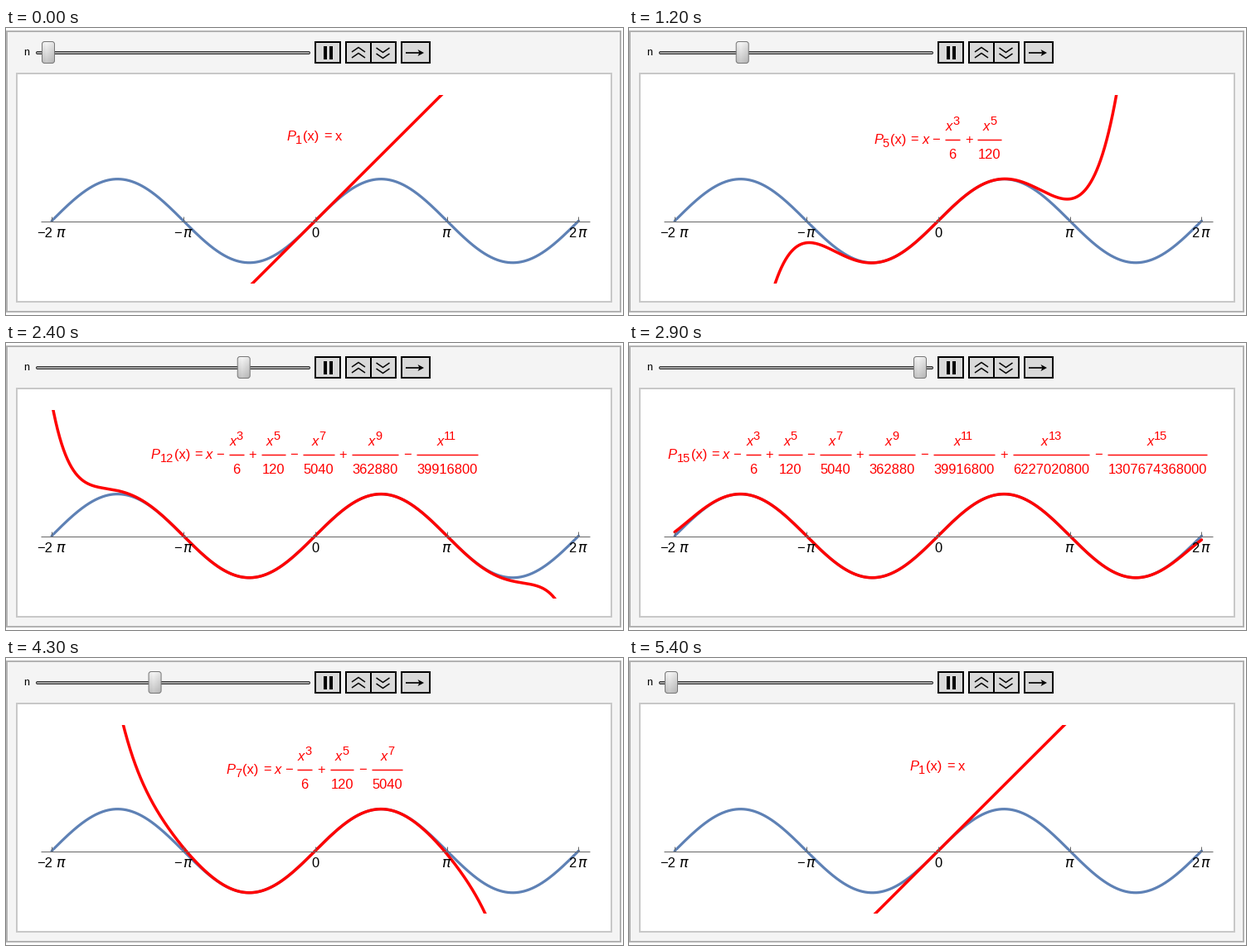
A matplotlib script that plays this animation: 744 px wide and 347 px high, repeating every 6000 ms.

```python
import math

import numpy as np
import matplotlib.pyplot as plt
from matplotlib.animation import FuncAnimation
from matplotlib.patches import FancyBboxPatch, Polygon, Rectangle

W, H, DPI = 744, 347, 100
PT = 72 / DPI                      # points per pixel
UNIT, X0, Y0 = 50.56, 372.8, 233.2  # plot scale and origin
RED, BLUE, AXIS = "#ff0000", "#5e81b5", "#666666"
N_MAX, FRAMES, INTERVAL = 15, 60, 100
MID, PAD, GAP = 372.3, 85, 21.6    # formula centre, prefix width, operator gap
BIG, SMALL = 16.5, 14.6            # font sizes in pixels

fig = plt.figure(figsize=(W / DPI, H / DPI), dpi=DPI, facecolor="white")
ax = fig.add_axes([0, 0, 1, 1])
ax.set_xlim(0, W)
ax.set_ylim(H, 0)
ax.axis("off")


def label(x, y, s, size=BIG, color="black", ha="left", italic=False,
          font="Liberation Sans"):
    return ax.text(x, y, s, fontsize=size * PT, color=color, ha=ha,
                   va="baseline", family=font, zorder=8,
                   style="italic" if italic else "normal")


def line(xs, ys, color, width, z=4, cap="butt"):
    return ax.plot(xs, ys, color=color, lw=width * PT, zorder=z,
                   solid_capstyle=cap, solid_joinstyle="miter")[0]


def box(x1, y1, x2, y2, face, edge, width=2):
    ax.add_patch(Rectangle((x1, y1), x2 - x1, y2 - y1, fc=face, ec=edge,
                           lw=width * PT, zorder=1))


def rounded(x, y, w, h, r, face, edge, z):
    shape = FancyBboxPatch((x, y), w, h, fc=face, ec=edge, lw=PT, zorder=z,
                           boxstyle=f"round,pad=0,rounding_size={r}")
    return ax.add_patch(shape)


def draw_panel():
    box(1, 4, 741, 343, "#f4f4f4", "#b2b2b2")
    box(13, 55, 730, 331, "white", "#c8c8c8")
    label(21, 33, "n", 12.5)
    rounded(36.5, 28.5, 330, 3, 1.5, "#a0a0a0", "#333333", 2)

    for x1, x2 in ((373, 403), (410, 440), (440, 470), (477, 511)):
        box(x1, 17, x2, 42, "#d9d9d9", "black")
    for x in (383, 390):
        ax.add_patch(Rectangle((x, 22), 4, 16, fc="black", lw=0, zorder=3))
    for y in (23.5, 30.5):
        line([417, 425, 433], [y + 5.5, y, y + 5.5], "black", 1.5)
        line([446.5, 454.5, 462.5], [y + 0.5, y + 6, y + 0.5], "black", 1.5)
    line([482, 501], [30, 30], "black", 1.7)
    ax.add_patch(Polygon([(504, 30), (496.5, 26), (498.5, 30), (496.5, 34)],
                         fc="black", lw=0, zorder=4))


def draw_axes():
    line([42, 704], [233.5, 233.5], AXIS, 1, 6)
    for k in range(-2, 3):
        x = X0 + k * math.pi * UNIT
        line([x, x], [228, 233], AXIS, 1, 6)
    for x, s in ((37.5, "\u22122"), (202.5, "\u2212"), (678.5, "2"), (368, "0")):
        label(x, 253, s)
    for x in (60.5, 213.5, 525.5, 689.5):
        label(x, 253, "\u03c0", 17.5, italic=True, font="DejaVu Sans")


def bar_width(k):
    return max(18, 9.17 * len(str(math.factorial(k))) + 0.9)


def formula(n):
    """Build the hidden artists that spell out the polynomial of order n."""
    powers = range(3, n + 1, 2)
    shift = 8 * (len(str(n)) - 1)
    total = PAD + shift - GAP + sum(bar_width(k) + GAP for k in powers)
    if not powers:
        total = 66
    x = MID - total / 2
    base = 140 if powers else 136
    parts = []

    def put(*args, **kw):
        parts.append(label(*args, color=RED, **kw))

    put(x - 0.8, base, "P", italic=True)
    put(x + 10, base + 4, str(n), size=SMALL)
    x += shift
    put(x + 19, base, "(x)")
    put(x + 48.5, base, "=", ha="center")
    put(x + 61.5, base, "x", ha="center", italic=bool(powers))

    x += PAD
    for i, k in enumerate(powers):
        w = bar_width(k)
        mid = x + w / 2
        op = x - (10.5 if i == 0 else GAP / 2)
        put(op, base, "+" if i % 2 else "\u2212", ha="center")
        left = mid - (8.3 + 8.1 * len(str(k))) / 2
        put(left, 124, "x", italic=True)
        put(left + 8.6, 117, str(k), size=SMALL)
        put(mid, 158, str(math.factorial(k)), ha="center")
        parts.append(line([x, x + w], [135, 135], RED, 1.4))
        x += w + GAP

    for p in parts:
        p.set_visible(False)
    return parts


def taylor(t, n):
    return sum((-1) ** (k // 2) * t ** k / math.factorial(k)
               for k in range(1, n + 1, 2))


def order(frame):
    """Order rises from 1 to 15 and falls back, one step per 1.75 frames."""
    steps = math.floor((frame - 6) / 1.75) + 1
    steps = min(max(steps, 0), 2 * (N_MAX - 1))
    return N_MAX - abs(N_MAX - 1 - steps)


draw_panel()
draw_axes()

t = np.linspace(-2 * math.pi, 2 * math.pi, 800)
line(X0 + UNIT * t, Y0 - UNIT * np.sin(t), BLUE, 3.2, 3, "round")
curve = line([], [], RED, 3.5, 5, "round")
window = Rectangle((42, 81), 662, 228, transform=ax.transData)
curve.set_clip_path(window)

formulas = [formula(n) for n in range(1, N_MAX + 1)]

thumb = rounded(43.5, 16.5, 15, 26, 3, "none", "#777777", 8)
u, v = np.meshgrid(np.linspace(0, 1, 16), np.linspace(0, 1, 27))
shade = 0.97 - 0.2 * v - 0.12 * np.abs(u - 0.35)
sheen = ax.imshow(shade, cmap="gray", vmin=0, vmax=1, zorder=7,
                  aspect="auto", extent=(43, 59, 43, 16))
ax.set_xlim(0, W)
ax.set_ylim(H, 0)


def update(frame):
    n = order(frame)
    x = 43 + 300 * (n - 1) / (N_MAX - 1)
    thumb.set_x(x + 0.5)
    sheen.set_extent((x, x + 16, 43, 16))
    sheen.set_clip_path(thumb)
    ax.set_xlim(0, W)
    ax.set_ylim(H, 0)
    curve.set_data(X0 + UNIT * t, Y0 - UNIT * taylor(t, n))
    for i, parts in enumerate(formulas, 1):
        for p in parts:
            p.set_visible(i == n)
    return []


anim = FuncAnimation(fig, update, frames=FRAMES, interval=INTERVAL,
                     init_func=lambda: update(0), repeat=True, repeat_delay=0)
plt.show()
```
